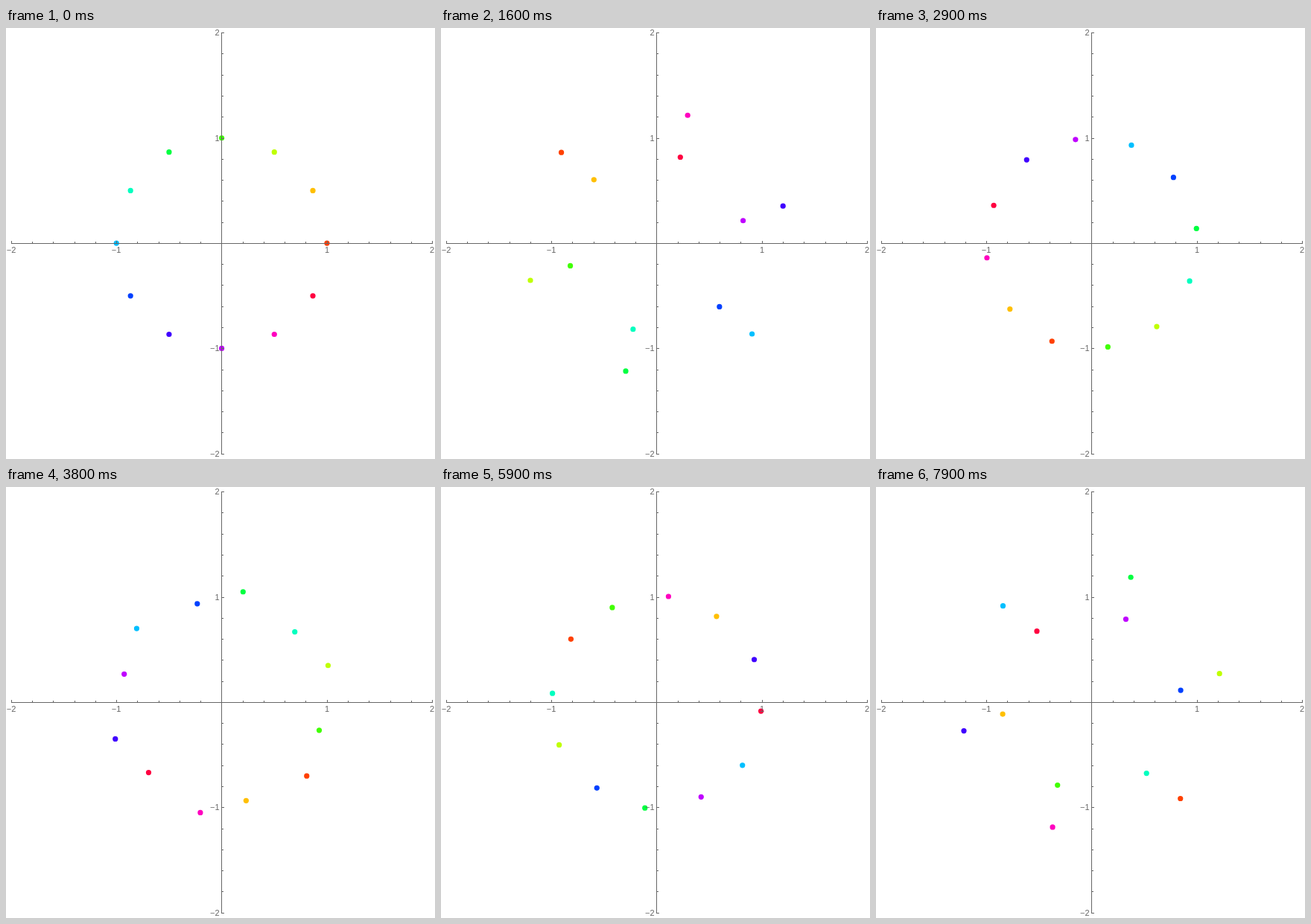
Write an HTML page that moves like this. It is 576 px wide and 579 px high and loops after 8 s.

```html
<!DOCTYPE html>
<html lang="en">
<head>
<meta charset="utf-8">
<title>Twelve bodies</title>
<style>
  html, body { margin: 0; width: 100%; height: 100%; overflow: hidden; background: #fff; }
  svg { display: block; }
  path { stroke: #666; fill: none; shape-rendering: crispEdges; }
  text { font: 11px "Liberation Sans", Arial, sans-serif; fill: #666; }
</style>
</head>
<body>
<svg width="576" height="579" viewBox="0 0 576 579">
  <g id="dots"></g>
  <path id="axes"/>
  <g id="labels"></g>
</svg>
<script>
const CX = 289.6, CY = 289.1, UNIT = 141.35;
const LOOP = 8000, STEP = 100;
const BEAT = 3106;      // ms for one ring to pass the other by one gap
const SPIN = 0.07534;   // mean rotation, degrees per ms
const RAD = Math.PI / 180;

function add(parent, tag, attrs) {
  const el = document.createElementNS('http://www.w3.org/2000/svg', tag);
  for (const name in attrs) el.setAttribute(name, attrs[name]);
  return document.getElementById(parent).appendChild(el);
}

function drawAxes() {
  let d = 'M7 289.5H573M289.5 6V573';
  for (let i = -10; i <= 10; i++) {
    if (i === 0) continue;
    const major = i % 5 === 0;
    const size = major ? 4 : 3;
    const x = Math.floor(289.9 + i * UNIT / 5) + 0.5;
    const y = Math.floor(289.4 - i * UNIT / 5) + 0.5;
    d += `M${x} 290v${-size}M289 ${y}h${size}`;
    if (!major) continue;
    const value = i / 5;
    const label = (value < 0 ? '\u2212' : '') + Math.abs(value);
    add('labels', 'text', { x: x - 0.5, y: 302, 'text-anchor': 'middle' }).textContent = label;
    add('labels', 'text', { x: 286.5, y: y + 3.5, 'text-anchor': 'end' }).textContent = label;
  }
  document.getElementById('axes').setAttribute('d', d);
}

const dots = Array.from({ length: 12 }, (_, k) =>
  add('dots', 'circle', { r: 3.6, fill: `hsl(${15 + 30 * k}, 100%, 50%)` }));

// Even dots swing outside and lead, odd dots swing inside and lag.
function draw(t) {
  const p = 2 * Math.PI * t / BEAT;
  const { sin, cos } = Math;
  const mean = SPIN * t + 0.2 * sin(p);
  const lead = 60 * t / BEAT - 8.424 * sin(p) + 0.355 * sin(2 * p) + 0.092 * sin(3 * p);
  const outer = 1.1074 - 0.1258 * cos(p) + 0.0184 * cos(2 * p);
  const inner = 0.9383 + 0.0749 * cos(p) - 0.0145 * cos(2 * p) + 0.0013 * cos(3 * p);
  dots.forEach((dot, k) => {
    const odd = k % 2;
    const angle = (30 * k + mean + (odd ? -lead : lead) / 2) * RAD;
    const r = UNIT * (odd ? inner : outer);
    dot.setAttribute('cx', CX + r * cos(angle));
    dot.setAttribute('cy', CY - r * sin(angle));
  });
}

const start = performance.now();
function tick() {
  const t = (performance.now() - start) % LOOP;
  draw(Math.floor(t / STEP) * STEP);
  requestAnimationFrame(tick);
}

drawAxes();
tick();
</script>
</body>
</html>
```
